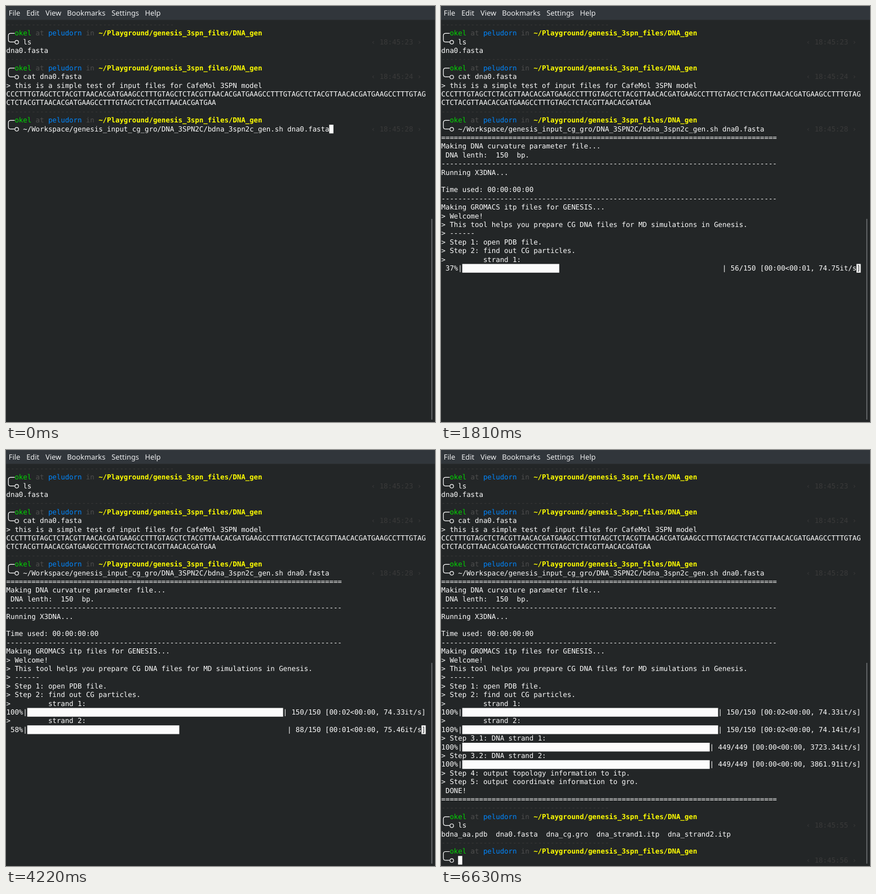
These frames come from a looping animation (761 by 736 pixels, 8 s). An HTML page:

```html
<!DOCTYPE html>
<html lang="en">
<head>
<meta charset="utf-8">
<title>Terminal</title>
<style>
  html, body { margin: 0; width: 100%; height: 100%; overflow: hidden; background: #232627; }
  svg { display: block; }
  text {
    font: 12.36px "DejaVu Sans Mono", monospace;
    fill: #fcfcfc;
    white-space: pre;
    text-rendering: geometricPrecision;
  }
  .menu { font: 12.8px "Noto Sans", sans-serif; fill: #eff0f1; }
  .faint { fill: #3a3a3a; }
  .grey { fill: #4e4e4e; }
  .user { fill: #00d700; }
  .host { fill: #0087ff; }
  .path { fill: #ffff00; font-weight: bold; }
  .ink { fill: #232627; }
  .line { fill: none; stroke: #fcfcfc; stroke-width: 1.2; }
</style>
</head>
<body>
<svg id="stage" width="761" height="736" viewBox="0 0 761 736"></svg>
<script>
const LOOP = 8000, CW = 7.44, CH = 15.4, LEFT = 0.5, TOP = 25.2, COLS = 100;
const stage = document.getElementById('stage');
const timed = [];

const colX = c => LEFT + c * CW;
const rowY = r => TOP + r * CH;

function make(tag, attrs, content = '') {
  const el = document.createElementNS('http://www.w3.org/2000/svg', tag);
  for (const k in attrs) el.setAttribute(k, attrs[k]);
  el.textContent = content;
  stage.append(el);
  return el;
}

function show(el, on) {
  el.style.display = on ? '' : 'none';
}

// Everything put on the grid appears at time `from` and stays.
function timedMake(from, ...args) {
  const el = make(...args);
  if (from) timed.push({ el, from });
  return el;
}

function put(from, row, col, str, cls = '') {
  return timedMake(from, 'text', { x: colX(col), y: rowY(row) + 11.6, class: cls }, str);
}

function lines(from, row, list) {
  list.forEach((str, i) => str && put(from, row + i, 0, str));
}

function prompt(from, row, clock) {
  put(from, row, 0, '-'.repeat(40), 'faint');
  put(from, row + 1, 2, 'okel', 'user');
  put(from, row + 1, 7, 'at', 'grey');
  put(from, row + 1, 10, 'peludorn', 'host');
  put(from, row + 1, 19, 'in', 'grey');
  put(from, row + 1, 22, '~/Playground/genesis_3spn_files/DNA_gen', 'path');
  put(from, row + 2, 87, `‹ ${clock} ›`, 'faint');
  const x = colX(0.5), end = colX(2), y1 = rowY(row + 1.5), y2 = rowY(row + 2.5);
  timedMake(from, 'path', {
    class: 'line',
    d: `M${end} ${y1}H${x + 4}Q${x} ${y1} ${x} ${y1 + 4}V${y2 - 4}Q${x} ${y2} ${x + 4} ${y2}H${end}`
  });
  timedMake(from, 'circle', { class: 'line', cx: colX(2.5), cy: y2 + 0.4, r: 3.2, 'stroke-width': 1 });
}

// Window chrome
make('rect', { width: 761, height: 736, fill: '#232627' });
make('rect', { width: 761, height: 24.6, fill: '#31363b' });
[['File', 4.8], ['Edit', 36.2], ['View', 70], ['Bookmarks', 108.3], ['Settings', 187.2], ['Help', 246.6]]
  .forEach(([label, x]) => make('text', { x, y: 17, class: 'menu' }, label));
make('rect', { x: 754.6, y: 376.5, width: 1.6, height: 355.5, rx: 0.8, fill: '#6f7375' });

// Terminal content
const dna = ('C' + 'CCTTTGTAGCTCTACGTTAACACGATGAAG'.repeat(5)).slice(0, 150);
const thick = '='.repeat(80), thin = '-'.repeat(80);

prompt(0, 0, '18:45:23');
put(0, 2, 4, 'ls');
put(0, 3, 0, 'dna0.fasta');
prompt(0, 4, '18:45:24');
put(0, 6, 4, 'cat dna0.fasta');
lines(0, 7, ['> this is a simple test of input files for CafeMol 3SPN model', dna.slice(0, COLS), dna.slice(COLS)]);
prompt(0, 10, '18:45:28');
put(0, 12, 4, '~/Workspace/genesis_input_cg_gro/DNA_3SPN2C/bdna_3spn2c_gen.sh dna0.fasta');
lines(500, 13, [thick, 'Making DNA curvature parameter file...', ' DNA lenth:  150  bp.', thin, 'Running X3DNA...']);
lines(880, 19, ['Time used: 00:00:00:00', thin, 'Making GROMACS itp files for GENESIS...']);
lines(1110, 22, [
  '> Welcome!',
  '> This tool helps you prepare CG DNA files for MD simulations in Genesis.',
  '> ------',
  '> Step 1: open PDB file.',
  '> Step 2: find out CG particles.',
  '>         strand 1:'
]);
put(3060, 29, 0, '>         strand 2:');
put(5060, 31, 0, '> Step 3.1: DNA strand 1:');
put(5200, 33, 0, '> Step 3.2: DNA strand 2:');
put(5200, 35, 0, '> Step 4: output topology information to itp.');
lines(5350, 36, ['> Step 5: output coordinate information to gro.', ' DONE!', thick]);
prompt(5350, 39, '18:45:55');
put(6060, 41, 4, 'l');
put(6490, 41, 5, 's');
put(6630, 42, 0, 'bdna_aa.pdb  dna0.fasta  dna_cg.gro  dna_strand1.itp  dna_strand2.itp');
prompt(6630, 43, '18:45:56');

// Progress bars: redrawn at these moments, eight iterations per update
const ticks = [
  1110, 1250, 1320, 1440, 1560, 1680, 1810,
  1960, 2080, 2200, 2320, 2440, 2610, 2710, 2810, 2910,
  3060, 3200, 3340, 3480, 3630, 3770, 3920, 4060,
  4220, 4330, 4450, 4560, 4670, 4790, 4900, 5060, 5200
];
const batch = (t, t0, n0, gap) => Math.max(0, 8 * Math.round(n0 + (t - t0) / gap));

const bars = [
  { row: 28, from: 1110, done: 3060, total: 150, count: t => batch(t, 1250, 1, 99),
    rates: [[8, 74.59], [104, 74.91], [150, 74.33]] },
  { row: 30, from: 3060, done: 5060, total: 150, count: t => batch(t, 3480, 4, 101.4),
    rates: [[8, 76.9], [32, 76.04], [144, 74.88], [150, 74.14]] },
  { row: 32, from: 5060, done: 5200, total: 449, count: () => 0, rates: [[449, 3723.34]] },
  { row: 34, from: 5200, done: 5200, total: 449, count: () => 0, rates: [[449, 3861.91]] }
];
for (const b of bars) {
  b.head = put(b.from, b.row, 0, '');
  b.tail = put(b.from, b.row, 0, '');
  b.fill = timedMake(b.from, 'rect', { x: colX(5), y: rowY(b.row), height: CH, fill: '#fcfcfc' });
}

function rateAt(points, n) {
  const i = points.findIndex(p => p[0] >= n);
  if (i < 1) return points[0][1];
  const [n0, r0] = points[i - 1], [n1, r1] = points[i];
  return r0 + (r1 - r0) * (n - n0) / (n1 - n0);
}

const clock = s => '00:' + String(Math.floor(s)).padStart(2, '0');

function drawBar(b, t) {
  const n = t >= b.done ? b.total : Math.min(b.count(t), b.total);
  if (n === b.last) return;
  b.last = n;
  const part = n / b.total, rate = rateAt(b.rates, n);
  const speed = n
    ? `${clock(n / rate)}<${clock((b.total - n) / rate)}, ${rate.toFixed(2)}it/s`
    : '00:00<?, ?it/s';
  const stats = `| ${n}/${b.total} [${speed}]`;
  const cells = Math.floor(part * (COLS - 5 - stats.length) * 8) / 8;
  b.head.textContent = String(Math.floor(part * 100)).padStart(3) + '%|';
  b.tail.textContent = stats;
  b.tail.setAttribute('x', colX(COLS - stats.length));
  b.fill.setAttribute('width', cells * CW);
}

// Cursor: time, row, column, covered character
const cursorSteps = [
  [0, 12, 77, ''], [500, 18, 0, ''], [880, 22, 0, ''], [1110, 28, 99, ']'],
  [3060, 30, 99, ']'], [5060, 32, 99, ']'], [5200, 36, 0, ''], [5350, 41, 4, ''],
  [6060, 41, 5, ''], [6490, 41, 6, ''], [6630, 45, 4, '']
];
const cursor = make('rect', { width: CW, height: CH, fill: '#fcfcfc' });
const covered = put(0, 0, 0, '', 'ink');

const lastBefore = (list, t, time) => list.reduce((a, s) => time(s) <= t ? s : a, list[0]);

function drawCursor(t) {
  const [, row, col, ch] = lastBefore(cursorSteps, t, s => s[0]);
  cursor.setAttribute('x', colX(col));
  cursor.setAttribute('y', rowY(row));
  covered.setAttribute('x', colX(col));
  covered.setAttribute('y', rowY(row) + 11.6);
  covered.textContent = ch;
}

function draw() {
  const t = performance.now() % LOOP;
  const tick = lastBefore(ticks, t, s => s);
  for (const { el, from } of timed) show(el, t >= from);
  for (const b of bars) if (t >= b.from) drawBar(b, tick);
  drawCursor(t);
  requestAnimationFrame(draw);
}
draw();
</script>
</body>
</html>
```
